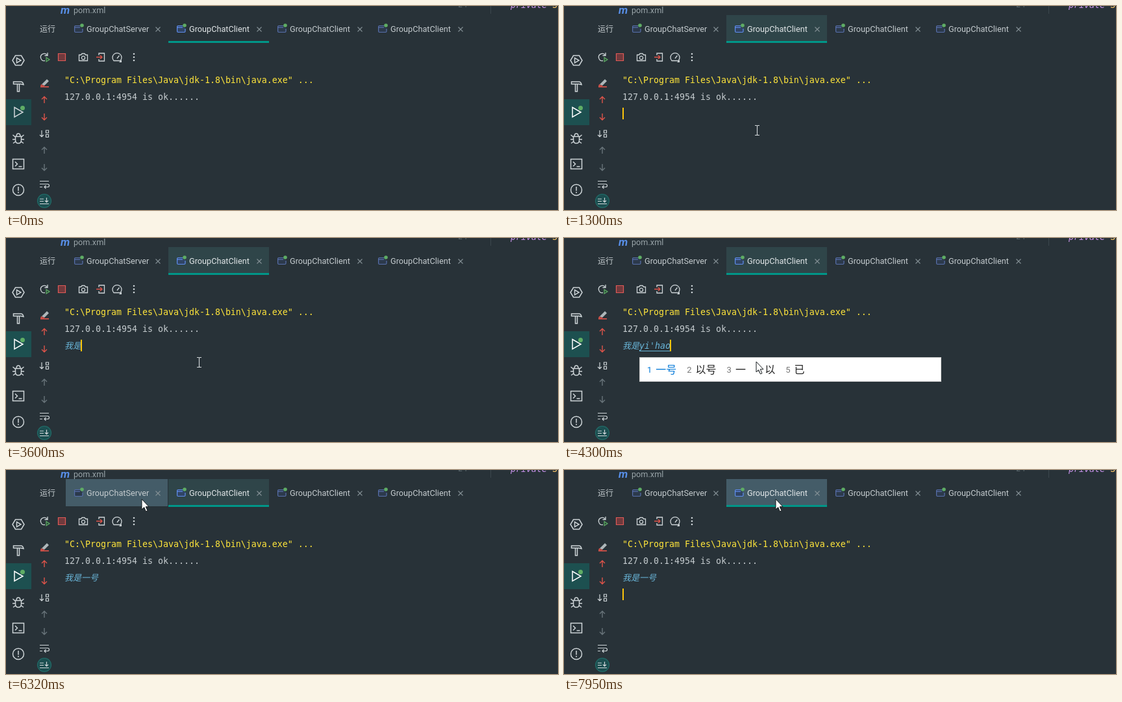
These frames come from a looping animation (850 px wide and 315 px high, 8000 ms). An HTML page with a canvas:

```html
<!DOCTYPE html>
<html lang="zh-CN">
<head>
<meta charset="utf-8">
<style>
  html, body { margin: 0; width: 850px; height: 315px; overflow: hidden; background: #283238; }
  canvas { display: block; }
</style>
</head>
<body>
<canvas id="stage" width="850" height="315"></canvas>
<script>
const ctx = document.getElementById('stage').getContext('2d');
const LOOP = 8000;
const CJK = '"Noto Sans CJK SC", "Noto Sans CJK", sans-serif';
const UI = 'Roboto, ' + CJK;
const MONO = '"DejaVu Sans Mono", "Noto Sans Mono", monospace';
const C = {
  bg: '#283238', focus: '#2f4549', hover: '#445c68', teal: '#009688',
  text: '#c4cbce', bright: '#e1e6e8', icon: '#ced5d8', dim: '#69757b',
  red: '#e0544a', green: '#5fad65', yellow: '#ffe53b', input: '#69b5d8'
};

function rect(color, x, y, w, h) {
  ctx.fillStyle = color;
  ctx.fillRect(x, y, w, h);
}

function disc(color, x, y, r) {
  ctx.fillStyle = color;
  ctx.beginPath();
  ctx.arc(x, y, r, 0, Math.PI * 2);
  ctx.fill();
}

// Draws SVG path data with its origin at (x, y).
function shape(x, y, d, stroke, width = 1.3, fill) {
  const path = new Path2D(d);
  ctx.save();
  ctx.translate(x, y);
  if (fill) { ctx.fillStyle = fill; ctx.fill(path); }
  if (stroke) { ctx.strokeStyle = stroke; ctx.lineWidth = width; ctx.stroke(path); }
  ctx.restore();
}

function label(text, x, y, font, color) {
  ctx.font = font;
  ctx.fillStyle = color;
  ctx.fillText(text, x, y);
  return x + ctx.measureText(text).width;
}

// Console text mixes a Latin monospace with a slightly smaller Chinese font.
function consoleText(text, x, y, color, style = '') {
  for (const run of text.match(/[\x00-\x7f]+|[^\x00-\x7f]+/g) || []) {
    const font = run.charCodeAt(0) < 128 ? '13.29px ' + MONO : '13px ' + CJK;
    x = label(run, x, y, style + ' ' + font, color);
  }
  return x;
}

const baseline = row => 119 + row * 26;

const tabs = [
  { x: 92, w: 157, name: 'GroupChatServer' },
  { x: 250, w: 155, name: 'GroupChatClient' },
  { x: 405, w: 155, name: 'GroupChatClient' },
  { x: 560, w: 155, name: 'GroupChatClient' }
];

function drawTab(tab, active, focused, hovered) {
  const { x, w, name } = tab;
  if (hovered) rect(C.hover, x, 14, w, 42);
  else if (active && focused) rect(C.focus, x, 14, w, 42);
  if (active) rect(C.teal, x, 54, w, 3);
  const blue = active ? '#608ff0' : '#5870ad';
  shape(x + 13, 30, 'M9 .5H2Q.6.5.6 2V9Q.6 10.5 2 10.5H11.5Q13 10.5 13 9V5M.6 3.2H9', blue, 1.2,
    active ? '#304566' : '#2c3a4c');
  disc(C.green, x + 25, 30, 2.8);
  label(name, x + 32, 40, '12.7px ' + UI, active ? C.bright : C.text);
  shape(x + w - 18.5, 32.5, 'M0 0L7 7M7 0L0 7', '#849095', 1.1);
}

function drawEditorEdge() {
  label('m', 84, 12, 'italic bold 17px ' + UI, '#588fe8');
  label('pom.xml', 104, 11, '12.7px ' + UI, '#99a4a8');
  label('24', 696, 2, '12px ' + MONO, '#59666c');
  rect('#3b474d', 746, 0, 1, 12);
  const end = label('private ', 777, 3, 'italic 13.29px ' + MONO, '#c792ea');
  label('St', end, 3, '13.29px ' + MONO, '#ffcb6b');
  label('运行', 52, 40, '12px ' + CJK, C.text);
}

function drawSidebar(focused) {
  rect(focused ? '#1d5050' : '#1d4749', 0, 144, 39, 40);
  const ink = C.icon, w = 1.5;
  shape(19, 84, 'M-4.5-7.5H4.5L9 0 4.5 7.5H-4.5L-9 0Z', ink, w);
  shape(19, 84, 'M-2.5-3.8L4 0-2.5 3.8Z', ink, w);
  shape(19, 124, 'M-7.5-7H4Q7-7 8-2.5L4-3.5H-7.5ZM-1.5-3.5V8H1.5V-3.5', ink, w);
  shape(19, 164, 'M-6-7.5L7 0-6 7.5Z', focused ? '#ffffff' : ink, w);
  disc(C.green, 25.5, 157.5, 3.5);
  shape(19, 204, 'M-4.5-2.5H4.5V3Q4.5 8 0 8T-4.5 3ZM-3-2.5Q-3-7 0-7T3-2.5M-8.5-5L-4.5-1.5M8.5-5L4.5-1.5M-9 2H-4.5M9 2H4.5M-8 8L-4 5M8 8L4 5', ink, w);
  shape(19, 244, 'M-8.5-7.5H8.5V7.5H-8.5ZM-5-3.5L-1.5 0-5 3.5M.5 4H5.5', ink, w);
  shape(19, 284, 'M8.5 0A8.5 8.5 0 1 1-8.5 0A8.5 8.5 0 1 1 8.5 0ZM0-5V1.5M0 3V5', ink, w);
}

function drawToolbar() {
  const ink = C.icon;
  shape(59, 79, 'M1 5.5A5.5 5.5 0 1 1 4.5-3M5-7V-2.5H.5', ink);
  shape(59, 79, 'M3 .5L8 3.8 3 7Z', C.green, 1.2, '#2b4a3a');
  shape(86, 79, 'M-5.5-5.5H5.5V5.5H-5.5Z', '#e05a57', 1.2, '#713a3d');
  shape(119, 79, 'M-6.5-3.5H-3.5L-2-5.5H2L3.5-3.5H6.5V5.5H-6.5ZM2.6 1A2.6 2.6 0 1 1-2.6 1A2.6 2.6 0 1 1 2.6 1', ink);
  shape(146, 79, 'M-3-3V-6H5.5V6H-3V3', ink);
  shape(146, 79, 'M-7 0H2M-1-3L2 0-1 3', C.red);
  shape(171, 79, 'M-5 5.5A7 7 0 1 1 5 5.5ZM0 2L3.5-2.5', ink);
  shape(178, 86, 'M0-3V1H-4Z', null, 0, ink);
  for (const y of [74, 79, 84]) disc(ink, 197, y, 1.3);
}

function arrow(y, direction, color) {
  const s = direction;
  shape(59, y, `M0 ${5 * s}V${-5 * s}M-4 ${-s}L0 ${-5 * s} 4 ${-s}`, color, 1.4);
}

function drawConsoleTools() {
  const ink = C.icon;
  shape(59, 119, 'M-4 2L4-6 7-3 0 4Z', null, 0, '#aeb7ba');
  shape(59, 119, 'M-4 2L-5 4H0', C.red, 1.5);
  rect(C.red, 53, 124, 13, 1.6);
  arrow(145, 1, C.red);
  arrow(171, -1, C.red);
  shape(59, 197, 'M-4-5V5M-7 2L-4 5-1 2M2.5-5H6.5V-1H2.5ZM2.5 1.5H6.5V5.5H2.5Z', ink, 1.2);
  arrow(223, 1, C.dim);
  arrow(249, -1, C.dim);
  shape(59, 275, 'M-7-4.5H7M-7 0H5Q7.5 0 7.5 2.3T5 4.5H0M2.5 2L0 4.5 2.5 7M-7 4.5H-3', ink, 1.2);
  disc('#22706b', 59, 301, 11);
  disc('#1c4e50', 59, 301, 10);
  shape(59, 301, 'M-7-3H-1M-7 .5H-1M-7 4.5H7M3.5-5V2M1-.5L3.5 2 6-.5', ink, 1.2);
}

// Pointer moves: start, end, number of steps, then from and to points.
const moves = [
  [180, 600, 10, 430, 303, 322, 38],
  [830, 990, 4, 322, 38, 296, 191],
  [5850, 6320, 11, 296, 191, 209, 45],
  [6800, 7170, 9, 209, 45, 326, 45]
];

function pointerAt(t) {
  const move = moves.filter(m => t >= m[0]).pop();
  if (!move) return null;
  const [t0, t1, n, x0, y0, x1, y1] = move;
  const step = Math.floor((t - t0) / (t1 - t0) * (n - 1) + 0.25) + 1;
  const p = Math.min(1, step / n);
  return { x: Math.round(x0 + (x1 - x0) * p), y: Math.round(y0 + (y1 - y0) * p) };
}

const between = (t, a, b) => t >= a && t < b;

function drawPointer(pos, t) {
  const overPopup = between(t, 2930, 3600) || between(t, 3880, 4630);
  if (pos.y > 95 && !overPopup) {
    const beam = 'M-3.5-7.5H-1Q0-7.5 0-6.5Q0-7.5 1-7.5H3.5M0-7V7M-3.5 7.5H-1Q0 7.5 0 6.5Q0 7.5 1 7.5H3.5';
    shape(pos.x + 1.5, pos.y + 1, beam, '#d5dadc', 1.1);
  } else {
    shape(pos.x, pos.y, 'M0 0V16L3.7 12.6 6.4 19 9 17.9 6.3 11.7H11Z', '#151a1d', 1, '#ffffff');
  }
}

// Input method: time, committed text, letters being composed, candidates.
const typing = [
  [0, '', '', ''],
  [2990, '', '', '我 为 问 无 网 完 文'],
  [3140, '', 'w', '我 为 问 无 网 完 文'],
  [3220, '', 'wo', '我 握 窝 卧 沃 喔 蜗'],
  [3300, '', "wo's", '我是 我说 我想 我送 我所'],
  [3370, '', "wo'sh", '我是 我说 我上 我谁 我身'],
  [3450, '', "wo'shi", '我是 卧室 我使 我 握'],
  [3600, '我是', '', ''],
  [3930, '我是', '', '有 也 一 要 与 由 用'],
  [4120, '我是', 'y', '有 也 一 要 与 由 用'],
  [4180, '我是', 'yi', '一 以 已 亿 易 意 医'],
  [4240, '我是', "yi'h", '一号 一会 以后 一 以'],
  [4300, '我是', "yi'hao", '一号 以号 一 以 已'],
  [4630, '我是一号', '', '']
];

function drawPopup(x, candidates) {
  rect('#c9c9c9', x, 184, 465, 38);
  rect('#ffffff', x + 1, 185, 463, 36);
  let left = x + 12;
  candidates.split(' ').forEach((word, i) => {
    const color = i ? '#202020' : '#0078d7';
    const end = label(i + 1 + '', left, 208, '13px ' + UI, i ? '#777777' : color);
    left = label(word, end + 6, 209, '16px ' + CJK, color) + 16;
  });
}

function caret(x, row) {
  rect('#fdc50b', Math.round(x), 105 + row * 26, 2, 18);
}

function drawClient(t) {
  consoleText('127.0.0.1:4954 is ok......', 90, baseline(1), C.text);
  const [, done, composing, candidates] = typing.filter(s => t >= s[0]).pop();
  const start = consoleText(done, 90, baseline(2), C.input, 'italic');
  const end = consoleText(composing, start, baseline(2), C.input, 'italic');
  if (composing) rect(C.input, start, baseline(2) + 3, end - start, 1);
  if (between(t, 1300, 2250) || between(t, 2750, 4970)) caret(done || composing ? end - 1 : 90, 2);
  if (between(t, 4970, 5750) || t >= 7890) caret(90, 3);
  if (candidates) drawPopup(start, candidates);
}

function drawServer(t) {
  [4954, 4963, 4970].forEach((port, i) =>
    consoleText(`/127.0.0.1:${port} 已上线.....`, 90, baseline(i + 1), C.text));
  consoleText('from 客户端： 127.0.0.1:4954 说：我是一号', 90, baseline(4), C.text);
  consoleText('服务器转发消息中.......', 90, baseline(5), C.text);
  if (t < 7540) caret(90, 6);
}

function draw(t) {
  const focused = t >= 1250;
  const serverOpen = between(t, 6550, 7820);
  const pos = pointerAt(t);
  rect(C.bg, 0, 0, 850, 315);
  drawEditorEdge();
  tabs.forEach((tab, i) => {
    const hovered = pos && between(pos.y, 14, 57) && between(pos.x, tab.x, tab.x + tab.w);
    drawTab(tab, i === (serverOpen ? 0 : 1), focused, hovered);
  });
  drawSidebar(focused);
  drawToolbar();
  drawConsoleTools();
  consoleText('"C:\\Program Files\\Java\\jdk-1.8\\bin\\java.exe" ...', 90, baseline(0), C.yellow);
  if (serverOpen) drawServer(t);
  else drawClient(t);
  if (pos) drawPointer(pos, t);
}

const began = performance.now();
function tick() {
  draw((performance.now() - began) % LOOP);
  requestAnimationFrame(tick);
}
tick();
</script>
</body>
</html>
```
